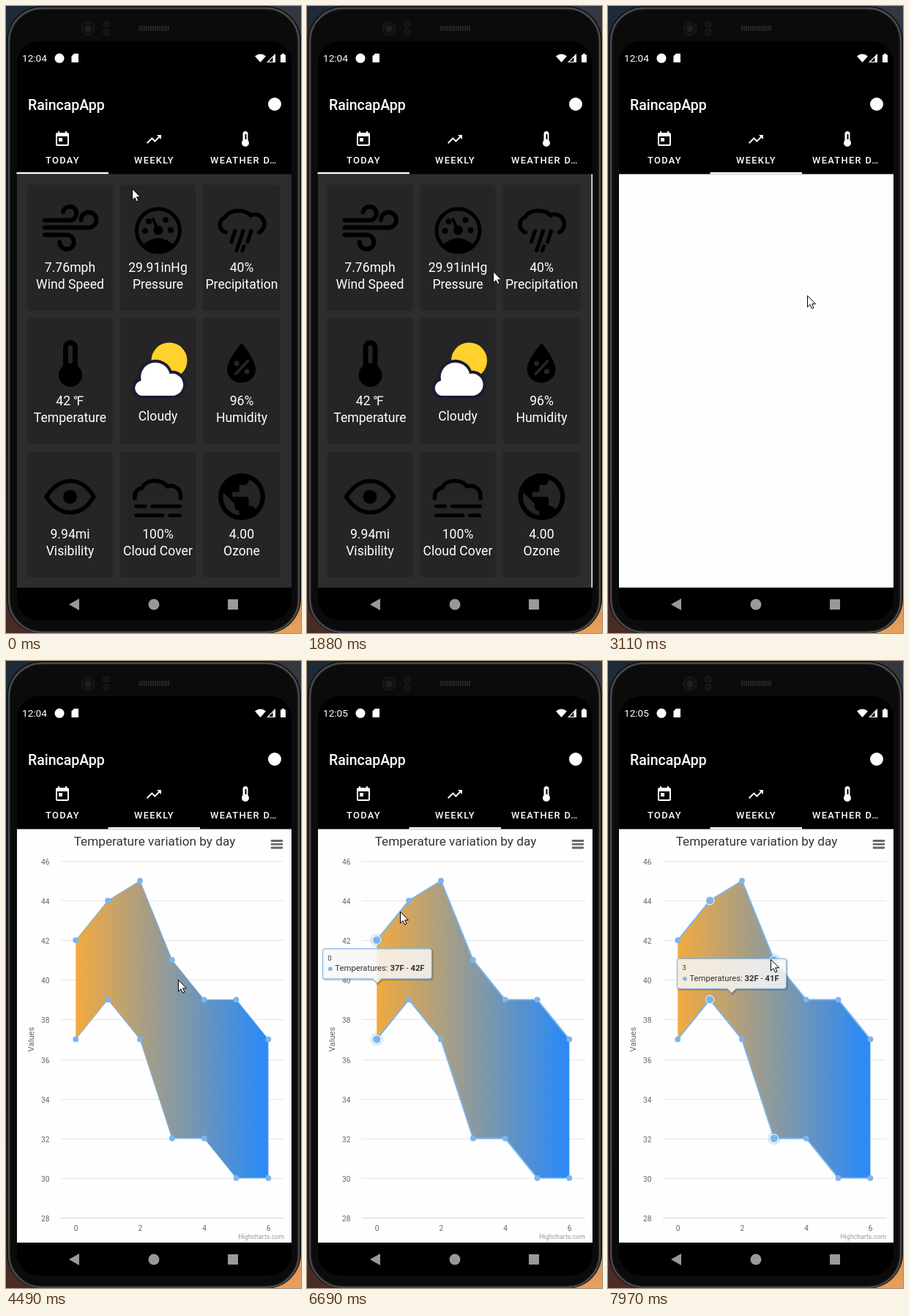
An HTML page for the animation above (8 s loop, 403x856 px).

```html
<!DOCTYPE html>
<html lang="en">
<head>
<meta charset="utf-8">
<title>Weather app</title>
<style>
  html, body { margin: 0; width: 100%; height: 100%; overflow: hidden; background: #000; }
  svg { display: block; width: 403px; height: 856px; font-family: Roboto, sans-serif; }
  .tab { font-size: 12.9px; font-weight: 500; letter-spacing: 1.3px; fill: #fff; }
  .card { font-size: 17.6px; fill: #fff; text-anchor: middle; }
  .line { fill: none; stroke: #000; stroke-linecap: round; stroke-linejoin: round; }
  .cut { fill: none; stroke: #252525; stroke-linecap: round; }
  .axis { font-size: 10.2px; fill: #666; }
</style>
</head>
<body>
<svg viewBox="0 0 403 856">
  <defs>
    <linearGradient id="wall" x2="0" y2="1">
      <stop stop-color="#1d2b38"/><stop offset=".6" stop-color="#222"/><stop offset="1" stop-color="#4a2c25"/>
    </linearGradient>
    <linearGradient id="wallRight" x2="0" y2="1">
      <stop stop-color="#343842"/><stop offset=".5" stop-color="#2a2020"/><stop offset="1" stop-color="#eaa05c"/>
    </linearGradient>
    <linearGradient id="heat">
      <stop stop-color="#f2aa40"/><stop offset=".95" stop-color="#2f8bf3"/>
    </linearGradient>
    <clipPath id="content"><rect x="15" y="229.5" width="375" height="564.5"/></clipPath>
    <clipPath id="reveal"><rect id="revealBox" x="75" y="270" height="500"/></clipPath>
    <path id="bubble" d="M3 0H146a3 3 0 0 1 3 3V38a3 3 0 0 1-3 3H80.500L74.500 47 68.500 41H3a3 3 0 0 1-3-3V3a3 3 0 0 1 3-3Z"/>
  </defs>

  <!-- phone body -->
  <rect width="202" height="856" fill="url(#wall)"/>
  <rect x="201" width="202" height="856" fill="url(#wallRight)"/>
  <rect x="1" y="0" width="402" height="857" rx="48" fill="#101011"/>
  <rect x="4" y="3" width="396" height="852" rx="45" fill="none" stroke="#48494a" stroke-width="2.5"/>
  <rect x="7" y="6" width="390" height="846" rx="42" fill="#0b0b0c"/>
  <rect x="15" y="48" width="375" height="791" rx="30" fill="#000"/>
  <g fill="#111" stroke="#202124">
    <circle cx="112" cy="31" r="9"/><circle cx="112" cy="31" r="4" fill="#1c2024"/>
    <circle cx="137" cy="25" r="4"/><circle cx="137" cy="36" r="4"/>
  </g>
  <path d="M182 30.5H223" stroke="#252525" stroke-width="7" stroke-dasharray="2 1"/>

  <!-- status bar and header -->
  <g fill="#fff">
    <text id="clock" x="22" y="76" font-size="13.6"></text>
    <circle cx="73" cy="71.3" r="6.5"/>
    <path d="M93 65H99V77H89.500V68.500Z"/>
    <path d="M340 68.500Q347.500 62.500 355 68.500L347.500 77Z"/>
    <path d="M368 65V77H356Z"/><path d="M364.500 70V76H359Z" fill="#000"/>
    <path d="M375 66.500H377V65H380V66.500H382V77H375Z"/>
    <text x="30" y="141.500" font-size="19.5" font-weight="500">RaincapApp</text>
    <circle cx="367" cy="134" r="9"/>
    <path transform="translate(65 170)" d="M19 3h-1V1h-2v2H8V1H6v2H5c-1.100 0-2 .9-2 2v14c0 1.100.9 2 2 2h14c1.100 0 2-.9 2-2V5c0-1.100-.9-2-2-2zm0 16H5V8h14zM7 10h5v5H7z"/>
    <path transform="translate(190 170)" d="M16 6l2.300 2.300-4.900 4.900-4-4L2 16.600 3.400 18l6-6 4 4 6.300-6.300L22 12V6z"/>
    <rect x="323.500" y="171" width="7" height="17" rx="3.500"/><circle cx="327" cy="187" r="5"/>
    <path d="M327.500 175V182" stroke="#000" stroke-width="2"/>
    <text class="tab" x="54" y="215">TODAY</text>
    <text class="tab" x="175" y="215">WEEKLY</text>
    <text class="tab" x="279" y="215">WEATHER D…</text>
    <rect id="indicator" y="227" width="125.500" height="2.500"/>
  </g>

  <g clip-path="url(#content)">
    <g id="today" stroke-width="6">
      <rect x="15" y="229" width="375" height="565" fill="#2d2d2d"/>
      <g id="cards"></g>
      <!-- wind -->
      <path class="line" d="M53 292.500H87a9.300 9.300 0 1 0-9-11.500M53 302.500H113a10.500 10.500 0 1 0-10.500-10.500M53 312.500H83a9.800 9.800 0 1 1-9.800 9.800"/>
      <!-- pressure -->
      <circle cx="208" cy="306.500" r="29.500" class="line" stroke-width="5"/>
      <path d="M187 326Q208 308 229 326Q208 346 187 326Z"/>
      <path class="line" stroke-width="4" d="M207 305L201 291"/>
      <circle cx="208" cy="306" r="6.500"/>
      <circle cx="190" cy="307" r="4"/><circle cx="195" cy="294" r="4"/><circle cx="218" cy="292" r="4"/><circle cx="225" cy="306" r="4"/>
      <!-- precipitation -->
      <path class="line" stroke-width="5.500" d="M300 309A11 11 0 0 1 300 288A18 11 0 0 1 334 286A12 12 0 0 1 346 309"/>
      <path class="line" stroke-width="5" d="M313 307L308 322M324 307L315 334M335 307L330 322M325 328L323 334"/>
      <!-- temperature -->
      <rect x="78" y="456" width="20" height="50" rx="10"/><circle cx="88" cy="504" r="16"/>
      <path class="cut" d="M88 466V485"/>
      <!-- cloudy -->
      <circle cx="223" cy="484" r="24.500" fill="#ffd12d"/>
      <path d="M188 534A12.400 12.400 0 0 1 182.500 510A21.900 21.900 0 0 1 225 500A17.100 17.100 0 0 1 229 534Z" fill="#fff" stroke="#1d1a35" stroke-width="4"/>
      <!-- humidity -->
      <path d="M322 460Q341 484 341 496A19.500 18.500 0 0 1 302 496Q302 484 322 460Z"/>
      <path class="cut" stroke-width="4" d="M330 485L314 502"/>
      <circle cx="315" cy="488" r="3.500" fill="#252525"/><circle cx="329" cy="499" r="3.500" fill="#252525"/>
      <!-- visibility -->
      <path class="line" stroke-width="5.500" d="M55 670Q69 648.500 88 648.500T120 670Q107 691.500 88 691.500T55 670Z"/>
      <circle cx="87.500" cy="670" r="9.500"/>
      <!-- cloud cover -->
      <path class="line" stroke-width="5.500" d="M176 672V669A11 11 0 0 1 186 658A18 13 0 0 1 220 656A13.500 13.500 0 0 1 238.500 669V672"/>
      <path class="line" stroke-width="5" d="M178 683H190M200 683H238M178 695.500H214M224 695.500H237"/>
      <!-- ozone -->
      <path transform="translate(283.600 631.600) scale(3.200)" d="M12 2a10 10 0 1 0 0 20 10 10 0 0 0 0-20zm-1 17.900c-4-.5-7-3.800-7-7.900 0-.6.1-1.200.2-1.800L9 15v1c0 1.100.9 2 2 2zm6.900-2.500c-.3-.8-1-1.400-1.900-1.400h-1v-3c0-.6-.4-1-1-1H8v-2h2c.6 0 1-.4 1-1V7h2c1.100 0 2-.9 2-2v-.4c2.900 1.200 5 4 5 7.400 0 2-.8 4-2.100 5.400z"/>
    </g>

    <g id="weekly">
      <rect x="15" y="229" width="376" height="565" fill="#fefefe"/>
      <g id="chart">
        <text x="203" y="252" font-size="17.200" fill="#333" text-anchor="middle">Temperature variation by day</text>
        <path d="M363 245.500H377M363 250.200H377M363 255H377" stroke="#666" stroke-width="2.800" stroke-linecap="round"/>
        <g id="grid"></g>
        <text transform="translate(38 516.500) rotate(-90)" font-size="11.300" fill="#666" text-anchor="middle">Values</text>
        <text x="380" y="789" font-size="8.800" fill="#999" text-anchor="end">Highcharts.com</text>
        <g clip-path="url(#reveal)">
          <path id="area" fill="url(#heat)"/>
          <path id="edges" fill="none" stroke="#7cb5ec" stroke-linejoin="round"/>
        </g>
        <g id="markers" fill="#7cb5ec"></g>
        <g id="tooltip">
          <use href="#bubble" x="1" y="1" fill="none" stroke="#000" stroke-opacity=".2" stroke-width="3"/>
          <use href="#bubble" fill="#f7f7f7" fill-opacity=".85" stroke="#7cb5ec"/>
          <circle cx="10.500" cy="27.500" r="2.800" fill="#7cb5ec"/>
          <text id="tipDay" x="7" y="16" font-size="9.500" fill="#333"></text>
          <text x="17" y="30.500" font-size="11.300" fill="#333">Temperatures: <tspan id="tipLow" font-weight="700"></tspan> - <tspan id="tipHigh" font-weight="700"></tspan></text>
        </g>
      </g>
    </g>
  </g>

  <g fill="#999">
    <path d="M86 817L100 809V825Z"/><circle cx="202" cy="817" r="7.500"/><rect x="303" y="810" width="14" height="14"/>
  </g>
  <path id="cursor" d="M.5 .5V16L4 12.700 6.500 18 9 17 6.600 11.800H11.500Z" fill="#fff" stroke="#000"/>
</svg>
<script>
const LOOP = 8000;
const $ = id => document.getElementById(id);

// Today page
const columns = [[29, 117], [156, 103], [269, 106]];
const readings = [
  ["7.76mph", "Wind Speed"], ["29.91inHg", "Pressure"], ["40%", "Precipitation"],
  ["42 ℉", "Temperature"], ["", "Cloudy"], ["96%", "Humidity"],
  ["9.94mi", "Visibility"], ["100%", "Cloud Cover"], ["4.00", "Ozone"]
];
$("cards").innerHTML = readings.map(([value, label], i) => {
  const [x, width] = columns[i % 3], y = 244 + 182 * Math.floor(i / 3), mid = x + width / 2;
  return `<rect x="${x}" y="${y}" width="${width}" height="172" rx="4" fill="#252525"/>
    <text class="card" x="${mid}" y="${y + 119}">${value}</text>
    <text class="card" x="${mid}" y="${y + (value ? 142 : 140)}">${label}</text>`;
}).join("");

// Weekly chart
const highs = [42, 44, 45, 41, 39, 39, 37];
const lows = [37, 39, 37, 32, 32, 30, 30];
const dayX = day => 95.3 + 43.85 * day;
const tempY = temp => 760 - (temp - 28) * 27.06;
const points = temps => temps.map((temp, day) => `${dayX(day)} ${tempY(temp)}`);
const path = list => "M" + list.join("L");

let grid = "";
for (let temp = 28; temp <= 46; temp += 2) {
  const y = Math.round(tempY(temp)) + .5;
  grid += `<path d="M75 ${y}H380" stroke="${temp > 28 ? "#e6e6e6" : "#ccd6eb"}"/>
    <text class="axis" x="59.500" y="${y + 4.5}" text-anchor="end">${temp}</text>`;
}
for (let day = 0; day <= 6; day += 2)
  grid += `<text class="axis" x="${dayX(day) + .3}" y="778" text-anchor="middle">${day}</text>`;
$("grid").innerHTML = grid;
$("area").setAttribute("d", path([...points(highs), ...points(lows).reverse()]) + "Z");
$("edges").setAttribute("d", path(points(highs)) + path(points(lows)));

// Motion: [time, ...values]
const cursorPath = [
  [0, 172, 249], [120, 172, 249], [370, 105, 330], [500, 80, 440], [700, 130, 600], [900, 290, 620],
  [1120, 372, 500], [1500, 290, 400], [1880, 254, 362], [2000, 260, 356], [2240, 271, 358],
  [2700, 272, 376], [3110, 272, 395], [3590, 272, 395], [4490, 235, 435], [4750, 225, 440],
  [5680, 112, 376], [5950, 97, 383], [6200, 97, 383], [6690, 127, 342], [6950, 138, 330],
  [7250, 139, 330], [7900, 222, 407], [8000, 222, 407]
];
// the swipe jumps between positions: [time, page scroll, indicator x]
const swipe = [[0, 0, 14.5], [1880, 1.5, 14.5], [2000, 350, 31], [2120, 374, 118], [2240, 375, 139.5]];
const taps = [[5950, 0], [7090, 1], [7960, 3]];
const CHART_AT = 3590, REVEAL_START = 3480, REVEAL_TIME = 1000, CLOCK_TICK = 6200;

function along(keys, t) {
  const i = keys.findIndex(key => key[0] > t);
  if (i < 0) return keys.at(-1).slice(1);
  const from = keys[i - 1], to = keys[i], p = (t - from[0]) / (to[0] - from[0]);
  return from.slice(1).map((v, k) => v + (to[k + 1] - v) * p);
}
const reached = (keys, t) => keys.filter(([time]) => time <= t);
const move = (id, x, y) => $(id).setAttribute("transform", `translate(${x} ${y})`);
const show = (id, visible) => $(id).setAttribute("visibility", visible ? "inherit" : "hidden");
const tipSpot = day => [dayX(day) - 74, (tempY(highs[day]) + tempY(lows[day])) / 2 - 56];

function drawTooltip(tap, previous, t) {
  show("tooltip", tap);
  if (!tap) return;
  const day = tap[1];
  let [x, y] = tipSpot(day);
  if (previous) {
    // the box closes a fixed share of the gap on each step
    const steps = Math.floor((t - tap[0]) / 32) + 1, [fromX, fromY] = tipSpot(previous[1]);
    x += (fromX - x) * (2 / 3) ** steps;
    y += (fromY - y) * .5 ** steps;
  }
  move("tooltip", x, y);
  $("tipDay").textContent = day;
  $("tipLow").textContent = lows[day] + "F";
  $("tipHigh").textContent = highs[day] + "F";
}

function drawMarkers(tap, previous, t) {
  const fading = previous && t - tap[0] < 50 ? previous[1] : -1;
  const marker = (temp, day) => {
    const at = `cx="${dayX(day)}" cy="${tempY(temp)}"`, active = tap && tap[1] === day;
    const halo = active ? `<circle ${at} r="9" opacity=".28"/>` : "";
    return halo + (active || day === fading
      ? `<circle ${at} r="5.700" stroke="#fff"/>` : `<circle ${at} r="3.900"/>`);
  };
  $("markers").innerHTML = [...highs.map(marker), ...lows.map(marker)].join("");
}

function render(t) {
  const [, scroll, indicatorX] = reached(swipe, t).at(-1);
  move("today", -scroll, 0);
  move("weekly", 375 - scroll, 0);
  $("indicator").setAttribute("x", indicatorX);
  $("clock").textContent = t < CLOCK_TICK ? "12:04" : "12:05";

  show("chart", t >= CHART_AT);
  const p = Math.min(1, Math.max(0, (t - REVEAL_START) / REVEAL_TIME));
  $("revealBox").setAttribute("width", 306 * (1 - Math.cos(Math.PI * p)) / 2);
  show("markers", p === 1);

  const done = reached(taps, t), tap = done.at(-1), previous = done.at(-2);
  $("edges").setAttribute("stroke-width", tap ? 1.9 : 1);
  drawMarkers(tap, previous, t);
  drawTooltip(tap, previous, t);
  move("cursor", ...along(cursorPath, t));
}

const start = performance.now();
function tick() {
  render(Math.max(0, performance.now() - start) % LOOP);
  requestAnimationFrame(tick);
}
tick();
</script>
</body>
</html>
```
